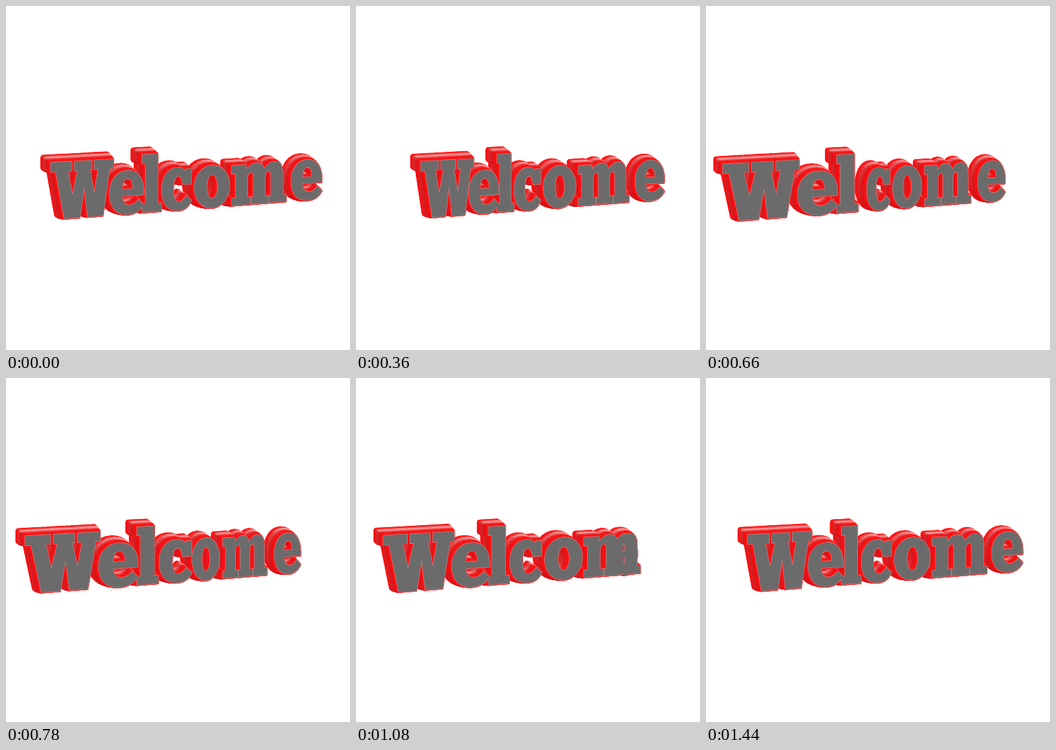
Write an HTML page with a canvas that moves like this. It is 512 px wide and 512 px high and loops after 1.5 s.

```html
<!DOCTYPE html>
<html lang="en">
<head>
<meta charset="utf-8">
<title>Welcome</title>
<style>
  html, body { margin: 0; width: 100%; height: 100%; overflow: hidden; background: #fff; }
  canvas { display: block; }
</style>
</head>
<body>
<canvas id="stage" width="512" height="512" role="img" aria-label="Welcome"></canvas>
<script>
const ctx = document.getElementById('stage').getContext('2d');
const LOOP = 1500, STEP = 60, LAYERS = 24;

// Closed oval built from four Bezier arcs.
function oval(cx, cy, rx, ry) {
  const a = rx * .56, b = ry * .56;
  return `M${cx - rx} ${cy} C${cx - rx} ${cy + b} ${cx - a} ${cy + ry} ${cx} ${cy + ry}` +
    ` C${cx + a} ${cy + ry} ${cx + rx} ${cy + b} ${cx + rx} ${cy}` +
    ` C${cx + rx} ${cy - b} ${cx + a} ${cy - ry} ${cx} ${cy - ry}` +
    ` C${cx - a} ${cy - ry} ${cx - rx} ${cy - b} ${cx - rx} ${cy} Z`;
}

// Outlines: x from the left edge, y up from the baseline.
const glyphs = {
  W: 'M0 80.5 L33 80.5 L33 67 L27 67 L34 33 L42 67 L37 67 L37 80.5 L65 80.5 L65 67 L62 67 L69 33' +
     ' L75 67 L69 67 L69 80.5 L100 80.5 L100 67 L94 67 L83 0 L58 0 L53 43 L46 0 L21 0 L8 67 L0 67 Z',
  e: 'M55 26 C56 49 47 63 28.5 63 C11 63 0 50 0 31 C0 11 11 -1.2 30 -1.2 C41 -1.2 49 3 55 12' +
     ' L46 20 C42 15 38 12.5 32 12.5 C25 12.5 20.5 17 20 26 Z' +
     ' M20 36 C20 46 23 51 28.5 51 C34 51 37 46 37 36 Z',
  l: 'M0 84.7 L25 84.7 L25 12 L30.6 12 L30.6 0 L0 0 L0 12 L5 12 L5 72 L0 72 Z',
  c: 'M48 60 L48 37 L34 37 C33 46 31 50 27 50 C20 50 19 41 19 31 C19 20 21 12 28 12 C33 12 36 15 39 20' +
     ' L48.4 13 C44 3 37 -1.2 27 -1.2 C9 -1.2 0 12 0 31 C0 50 9 63 25 63 C31 63 35 61 38 57 L39 60 Z',
  o: oval(29.5, 31, 29.5, 32.2) + oval(29.5, 31, 9, 18),
  m: 'M0 61 L24 61 L25 54 C30 60 35 63 41 63 C49 63 53 59 55 53 C60 60 66 63 72 63 C84 63 87 55 87 44' +
     ' L87 11 L92.8 11 L92.8 0 L63 0 L63 11 L66 11 L66 42 C66 47 65 49 62 49 C59 49 57 46 56 42' +
     ' L56 11 L62 11 L62 0 L32.5 0 L32.5 11 L36 11 L36 42 C36 47 35 49 32 49 C29 49 27 46 26 42' +
     ' L26 11 L31.5 11 L31.5 0 L0 0 L0 11 L6 11 L6 48 L0 48 Z'
};

// Left edge and centre of each letter along the text axis, right to left.
const letters = [
  ['e', 172.6, 200], ['m', 74.7, 121], ['o', 14.1, 43.6], ['c', -38.4, -14],
  ['l', -70.5, -55], ['e', -124.5, -97], ['W', -224, -174]
];

function project(x, h) {
  const sx = x / (1 + .0004 * x);
  return [267 + sx, 302.5 - .0785 * sx - h * (1 - .0003 * sx)];
}

function pose([name, left, centre], t) {
  const u = ((t - 764 - 1.9 * centre) / LOOP + 2) % 1;
  const scale = 1 - .057 * u - .257 * u * u;
  const outline = glyphs[name].replace(/(-?[\d.]+) (-?[\d.]+)/g,
    (_, x, h) => project((left + +x) * scale, +h).map(v => v.toFixed(2)).join(' '));
  const x = centre * scale;
  return {
    path: new Path2D(outline),
    dx: -13.5 + .0001 * (x - 30) ** 2,
    dy: -6.2 + .006 * x
  };
}

function layer({ path, dx, dy }, q, radius, colour, ox, oy) {
  ctx.setTransform(1, 0, 0, 1, dx * q + ox, dy * q + oy);
  ctx.fillStyle = ctx.strokeStyle = colour;
  ctx.lineWidth = radius * 2;
  ctx.fill(path, 'evenodd');
  ctx.stroke(path);
}

function draw(t) {
  ctx.setTransform(1, 0, 0, 1, 0, 0);
  ctx.fillStyle = '#fff';
  ctx.fillRect(0, 0, 512, 512);
  ctx.lineJoin = 'round';
  const poses = letters.map(letter => pose(letter, t));

  // Extrusion, back to front: a lit copy peeks out above each red one.
  for (let i = LAYERS; i >= 0; i--) {
    const q = i / LAYERS;
    const radius = .9 + 3.4 * Math.sin(q * Math.PI / 2);
    const shine = Math.round(20 + 185 * Math.exp(-(((q - .55) / .19) ** 2)));
    const side = Math.round(255 - 50 * Math.sin(Math.PI * q) ** 2);
    for (const p of poses) {
      layer(p, q, radius, `rgb(255,${shine},${shine})`, 0, 0);
      layer(p, q, radius, `rgb(${side},16,20)`, -.2, .5);
    }
  }

  // Coplanar faces merge where letters overlap, so all rims come first.
  ctx.setTransform(1, 0, 0, 1, 0, 0);
  ctx.lineWidth = 1.2;
  ctx.strokeStyle = '#d88';
  for (const { path } of poses) ctx.stroke(path);
  ctx.fillStyle = '#6b6b6b';
  for (const { path } of poses) ctx.fill(path, 'evenodd');
}

let shown = -1;
function tick() {
  const t = Math.floor(performance.now() % LOOP / STEP) * STEP;
  if (t !== shown) draw(shown = t);
  requestAnimationFrame(tick);
}
tick();
</script>
</body>
</html>
```
